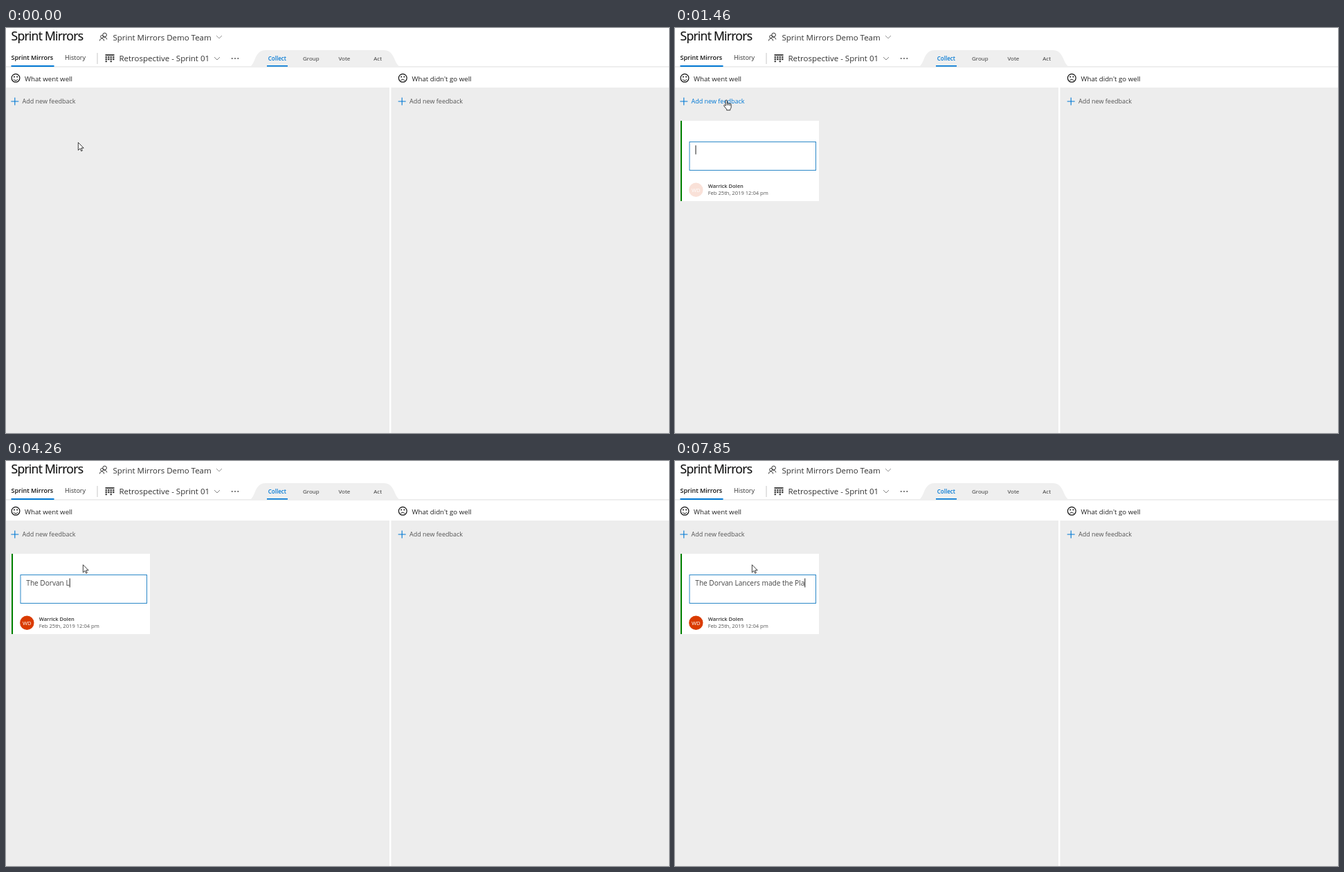
These frames come from a looping animation (958x585 px, 8 s). An HTML page:

```html
<!DOCTYPE html>
<html lang="en">
<head>
<meta charset="utf-8">
<title>Sprint board</title>
<style>
  html, body { margin: 0; width: 100%; height: 100%; overflow: hidden; background: #fff; }
  svg { display: block; }
  text { font-family: "Open Sans", "Noto Sans", sans-serif; fill: #333; white-space: pre; }
  .bold { font-weight: 600; }
  .blue { fill: #0078d4; }
  .dark { fill: #111; }
  .small { font-size: 9px; }
  .pivot { font-size: 8px; }
  .title { font-size: 11.5px; }
  .head { font-size: 9.7px; fill: #222; }
  .add { font-size: 9px; fill: #555; }
  .add.hover { fill: #0078d4; }
  .add.pressed { fill: #111; }
  .line { fill: none; stroke: #333; }
  .plus { fill: none; stroke: #0078d4; stroke-width: 1.1; }
  .pointer { fill: #fff; stroke: #111; stroke-width: 1.2; stroke-linejoin: round; }
</style>
</head>
<body>
<svg width="958" height="585" viewBox="0 0 958 585">
  <defs>
    <g id="face">
      <circle class="line" r="5.9" style="stroke:#111;stroke-width:1.2"/>
      <circle cx="-2.1" cy="-1.7" r="1" fill="#111"/>
      <circle cx="2.1" cy="-1.7" r="1" fill="#111"/>
    </g>
    <path id="plus" class="plus" d="M-5.5 0H5.5M0 -5.5V5.5"/>
    <path id="chevron" class="line" d="M-4 -2L0 2L4 -2"/>
  </defs>

  <!-- header -->
  <text class="dark" x="7.5" y="17.5" font-size="17.5" letter-spacing="-.7" stroke="#111" stroke-width=".2">Sprint Mirrors</text>
  <g class="line">
    <circle cx="142.6" cy="10" r="2.8"/>
    <circle cx="138.6" cy="12.6" r="2"/>
    <path d="M135.5 18.5C135.5 14 141.6 14 141.6 18.5M141.5 13.4C144 13 145.6 14.6 145.7 16.5"/>
  </g>
  <text class="title" x="154.5" y="17.5">Sprint Mirrors Demo Team</text>
  <use href="#chevron" x="308" y="13" opacity=".5"/>

  <rect y="55.5" width="958" height="1" fill="#dedede"/>
  <path d="M351 56.5C361 54 358 32 375 32H546C563 32 560 54 571 56.5Z" fill="#efefef"/>
  <text class="small bold dark" x="7.5" y="46">Sprint Mirrors</text>
  <text class="small" x="85" y="46">History</text>
  <rect class="blue" x="7.5" y="54" width="62" height="2"/>
  <rect x="131.5" y="36" width="1" height="16" fill="#c8c8c8"/>
  <g fill="none" stroke="#444">
    <path d="M143.5 39H156.5" stroke-width="2"/>
    <path d="M143.5 42.2H156.5M143.5 45.2H156.5" stroke-width="2.2" stroke-dasharray="2.5 1"/>
    <path d="M143.5 48.2H156.5" stroke-width="2" stroke-dasharray="2.5 4.5"/>
  </g>
  <text class="title" x="163.5" y="48.2">Retrospective - Sprint 01</text>
  <use href="#chevron" x="305" y="44" opacity=".6"/>
  <g fill="#444">
    <circle cx="326.7" cy="44" r=".9"/><circle cx="331" cy="44" r=".9"/><circle cx="335.3" cy="44" r=".9"/>
  </g>
  <text class="pivot bold blue" x="378.8" y="47.3">Collect</text>
  <text class="pivot" x="429" y="47.3">Group</text>
  <text class="pivot" x="480.5" y="47.3">Vote</text>
  <text class="pivot" x="531.3" y="47.3">Act</text>
  <rect class="blue" x="377" y="54" width="30" height="1.7"/>

  <!-- columns -->
  <rect y="86" width="554" height="499" fill="#ededed"/>
  <rect x="556.5" y="86" width="401.5" height="499" fill="#ededed"/>
  <use href="#face" x="14" y="72.3"/>
  <path class="line" d="M10.9 74Q14 78 17.1 74" style="stroke:#111"/>
  <text class="head" x="27" y="76.6">What went well</text>
  <use href="#face" x="573.3" y="72.3"/>
  <path class="line" d="M570.4 76Q573.3 72.4 576.2 76" style="stroke:#111"/>
  <text class="head" x="586.5" y="76.6">What didn't go well</text>
  <use href="#plus" x="12.8" y="106"/>
  <text id="add" class="add" x="23.5" y="109.4">Add new feedback</text>
  <use href="#plus" x="572.2" y="106"/>
  <text class="add" x="583" y="109.4">Add new feedback</text>

  <!-- feedback card -->
  <g id="card">
    <rect x="8" y="134" width="200" height="116" fill="#fff"/>
    <rect x="8" y="134" width="2" height="116" fill="#008000"/>
    <rect x="21" y="164.5" width="182.5" height="41" fill="#fff" stroke="#2b88c8"/>
    <text id="draft" x="29.3" y="180.2" font-size="10.1" style="fill:#444"></text>
    <rect id="caret" y="169.5" width="1" height="13" fill="#222"/>
    <g id="avatar">
      <circle cx="30.3" cy="233.7" r="10.2" fill="#da3b01"/>
      <text x="30.3" y="236.6" font-size="7.7" text-anchor="middle" style="fill:#fff">WD</text>
    </g>
    <text class="bold" x="47.7" y="231.3" font-size="7.5">Warrick Dolen</text>
    <text x="47.7" y="241.3" font-size="7.6" style="fill:#555">Feb 25th, 2019 12:04 pm</text>
  </g>

  <!-- mouse -->
  <g id="mouse">
    <circle id="press" r="8.2" fill="#ffee00" opacity=".72"/>
    <path id="arrow" class="pointer" transform="scale(.68)"
      d="M.5 .5V17L4.4 13.3L6.9 18.8L9.3 17.8L6.9 12.3H12Z"/>
    <path id="hand" class="pointer" transform="translate(-3.6 0) scale(.7)"
      d="M4 1.8A1.6 1.6 0 0 1 7.2 1.8V7A1.5 1.5 0 0 1 10 7.6A1.5 1.5 0 0 1 12.8 8.4A1.4 1.4 0 0 1 15.4 9.4V14Q15.4 17 13.4 18.8V21H6V19L1 13Q-.4 10.6 1.4 10.2Q2.6 10 4 12ZM7.2 7V11M10 8V11M12.8 9V12"/>
  </g>
</svg>
<script>
const LOOP = 8000, TICK = 77, BLINK = 540;
const PRESS = 1290, OPEN = 1460;
const MOVES = [
  { start: 520, steps: 9, from: [104, 165], to: [74, 104] },
  { start: 1530, steps: 6, from: [74, 104], to: [111, 149.5] },
];
// One time per key; \b deletes the last letter.
const KEYS = "The Dorvan Lancers made the Ply\ba";
const TIMES = [
  2620, 2920, 3010, 3100,
  3400, 3550, 3700, 3780, 3860, 3930, 4010,
  4260, 4490, 4560, 5040, 5120, 5270, 5420, 5420,
  5740, 5830, 5980, 6130, 6210,
  6280, 6360, 6430, 6510,
  6830, 6980, 7210, 7690, 7850,
];

const el = id => document.getElementById(id);
const [add, card, draft, caret, avatar, mouse, press, arrow, hand] =
  ["add", "card", "draft", "caret", "avatar", "mouse", "press", "arrow", "hand"].map(el);
const clamp = v => Math.min(1, Math.max(0, v));
const smooth = v => v * v * (3 - 2 * v);
const show = (node, on) => node.setAttribute("visibility", on ? "visible" : "hidden");

function pointerAt(t) {
  const { start, steps, from, to } = MOVES[t < MOVES[1].start ? 0 : 1];
  const step = Math.floor((t - start) / TICK) + 1;
  const k = smooth(clamp(step / steps));
  return from.map((v, i) => v + (to[i] - v) * k);
}

function typedAt(t) {
  const count = TIMES.filter(time => time <= t).length;
  let text = "";
  for (const key of KEYS.slice(0, count)) text = key === "\b" ? text.slice(0, -1) : text + key;
  return { text, last: count ? TIMES[count - 1] : OPEN };
}

function render(t) {
  const [x, y] = pointerAt(t);
  const over = x < 104 && y < 118;
  const pressed = t >= PRESS && t < OPEN;
  mouse.setAttribute("transform", `translate(${x} ${y})`);
  show(hand, over);
  show(arrow, !over);
  show(press, pressed);
  add.setAttribute("class", "add" + (pressed ? " pressed" : over ? " hover" : ""));

  const open = t >= OPEN;
  const { text, last } = typedAt(t);
  card.style.display = open ? "" : "none";
  if (!open) return;
  if (draft.textContent !== text) draft.textContent = text;
  caret.setAttribute("x", 29.5 + (text ? draft.getComputedTextLength() - .2 : 0));
  show(caret, (t - last) % (2 * BLINK) < BLINK);
  const fade = Math.floor((t - OPEN) / TICK) * TICK;
  avatar.setAttribute("opacity", .15 + .85 * smooth(clamp(fade / 340)));
}

const begin = performance.now();
function frame() {
  render((performance.now() - begin) % LOOP);
  requestAnimationFrame(frame);
}
frame();
</script>
</body>
</html>
```
